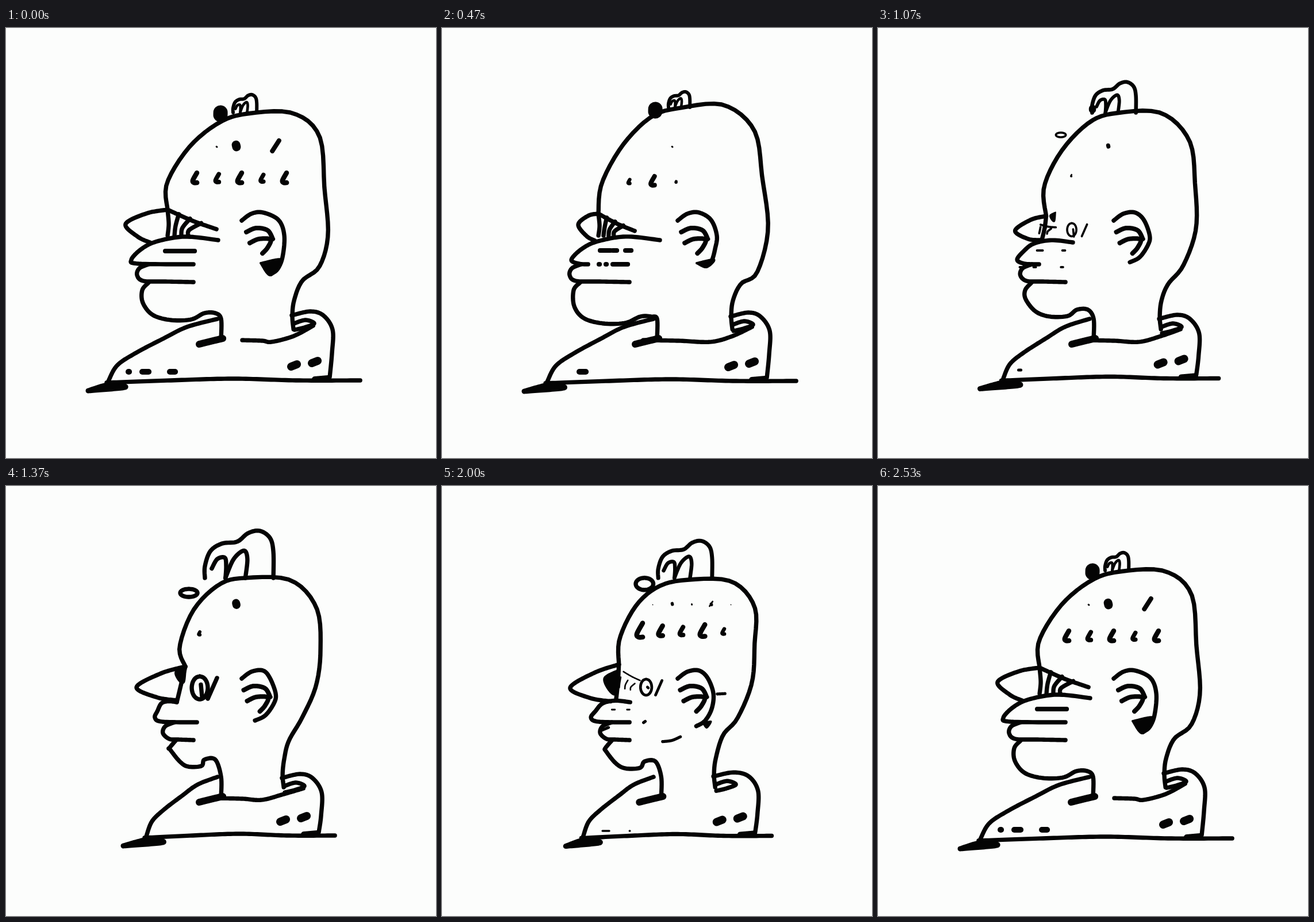
An HTML page with a canvas that plays this animation: 748 by 748 pixels, repeating every 2560 ms.

```html
<!DOCTYPE html>
<html lang="en">
<head>
<meta charset="utf-8">
<title>Morphing head</title>
<style>
html, body { margin: 0; overflow: hidden; background: #fcfdfc; }
canvas { display: block; }
</style>
</head>
<body>
<canvas id="stage" width="748" height="748"></canvas>
<script>
const ctx = document.getElementById('stage').getContext('2d');
const LOOP = 2560, STEPS = 76, SAMPLES = 72, LINE = 7.4;
const PAPER = '#fcfdfc', INK = '#040404';
const FILLED = ['lobe', 'nostril', 'shadow'];

const linear = k => k;
const smooth = k => k * k * (3 - 2 * k);
const easeIn = k => k ** 1.5;
const easeOut = k => 1 - (1 - k) ** 1.5;
const mix = (a, b, k) => a + (b - a) * k;
const between = (p, q, k, lift = 0) => [mix(p[0], q[0], k), mix(p[1], q[1], k) + lift];
const parse = text => text.split(' ').map(pair => pair.split(',').map(Number));

// Unit shapes, placed by position and size.
const BUN = parse('0,1 0,.75 .08,.43 .25,.27 .47,.23 .63,.05 .8,0 .95,.15 1,.45 1,1');
const CURL1 = parse('.1,.8 .18,.6 .29,.57 .31,.75 .3,1');
const CURL2 = parse('.3,1 .42,.6 .57,.42 .62,.6 .59,1');
const COLLAR = parse('0,0 .28,.13 .5,.32 .75,.55 .92,.75 1,1');
const EAR_FOLDS = [parse('418,355 435,348 455,352 464,367'), parse('424,374 440,367 460,368 455,382 446,392')];
const place = (shape, x, y, w, h) => shape.map(([u, v]) => [x + u * w, y + v * h]);
const ellipse = (x, y, rx, ry) => Array.from({ length: 13 }, (_, i) =>
  [x + rx * Math.sin(i * Math.PI / 6), y - ry * Math.cos(i * Math.PI / 6)]);

const poses = [
  { at: 0, ease: smooth, root: [281, 316],
    head: '280,270 318,208 370,165 420,149 498,148 545,188 554,280 560,360 545,415 515,440',
    noseTip: [208, 341], noseBase: [250, 373], lid: [366, 350],
    lip: [369, 369, 218, 326], lowerLip: 228, chin: [237, 508], throat: 374,
    neck: 497, shoulder: [568, 500], hem: 411, ground: [143, 616, 175, 613],
    ear: [484, 461, 428], lobe: true, tuft: [373, 151], bun: [395, 116, 41, 31],
    crown: [3, 15], slash: [469, 205], letters: [328, 263, 39, [1, 0.8, 1, 0.7, 1]],
    cheek: [277, 388, 26, [26, 25]], hemDots: [213, 598, 24, [1, 11, 0, 9]] },
  { at: 14, ease: linear, root: [272, 323],
    head: '278,270 315,203 365,154 415,139 490,134 543,178 557,260 567,350 548,425 520,445',
    noseTip: [237, 342], noseBase: [266, 370], lid: [335, 353],
    lip: [379, 369, 225, 254], lowerLip: 222, chin: [229, 514], throat: 374,
    neck: 502, shoulder: [570, 502], hem: 350, ground: [143, 616, 180, 614],
    ear: [478, 460, 414], lobe: true, tuft: [371, 145], bun: [394, 111, 37, 27],
    crown: [0, 3], letters: [325, 268, 41, [0.4, 0.9, 0.1]],
    cheek: [275, 387, 22, [18, 7, 10]], lipDots: [273, 411, 12, [1, 1, 10, 14]], hemDots: [215, 598, 24, [0, 11]] },
  { at: 23, ease: smooth, root: [273, 340],
    head: '276,272 313,211 366,156 415,136 490,132 543,180 556,260 567,350 547,423 517,448',
    noseTip: [250, 355], noseBase: [268, 365], lid: [319, 348],
    lip: [381, 370, 225, 228], lowerLip: 222, chin: [228, 516], throat: 376,
    neck: 498, shoulder: [568, 504], hem: 350, ground: [151, 613, 188, 611],
    ear: [476, 443, 407], tuft: [373, 143], bun: [399, 110, 33, 25],
    cheek: [273, 387, 23, [17, 0, 8]], lipDots: [245, 416, 24, [7, 7, 0, 6]], hemDots: [219, 595, 24, [0, 7]] },
  { at: 41, ease: smooth, root: [312, 314],
    head: '302,280 326,216 370,172 415,160 495,164 540,212 547,285 539,348 515,403 492,443',
    noseTip: [227, 350], noseBase: [297, 373], nostril: 0.45, eye: [337, 351, 22],
    lip: [297, 376, 259, 332], lowerLip: 273, chin: [284, 488], throat: 374,
    neck: 480, shoulder: [549, 508], hem: 365, ground: [204, 572, 241, 608],
    ear: [469, 433, 408], side: [318, 186, 15, 7], bun: [346, 78, 119, 82],
    crown: [0, 14], letters: [336, 257, 0, [0.3]] },
  { at: 53, ease: easeIn, root: [313, 309],
    head: '316,266 342,209 375,180 425,168 510,172 545,213 544,280 535,352 505,405 480,435',
    noseTip: [225, 355], noseBase: [305, 376], nostril: 1, eye: [355, 350, 2],
    lip: [305, 380, 269, 325], lowerLip: 289, chin: [299, 487], throat: 383,
    neck: 465, shoulder: [544, 507], ground: [241, 556, 264, 605],
    ear: [466, 432, 412], side: [337, 183, 16, 7], bun: [362, 87, 119, 78],
    crown: [0, 0, 0, 8], letters: [350, 250, 35, [1.6, 1, 0.7, 1.3, 0.2]],
    lines: ['275,426 292,419', '350,412 354,409', '377,446 400,443 421,434', '476,362 495,361'] },
  { at: 67, ease: easeOut, root: [298, 313],
    head: '296,266 326,211 375,168 425,155 490,155 541,205 543,270 546,325 530,402 505,430',
    noseTip: [219, 344], noseBase: [270, 372], lid: [362, 347],
    lip: [368, 369, 241, 328], lowerLip: 250, chin: [257, 499], throat: 378,
    neck: 485, shoulder: [560, 502], ground: [168, 605, 203, 615],
    ear: [483, 461, 428], lobe: true, side: [380, 147, 14, 17], bun: [402, 111, 47, 40],
    crown: [4, 15, 8, 0, 4], slash: [468, 205], letters: [331, 262, 39, [1.1, 1, 1, 1, 1.1]],
    cheek: [292, 389, 27, [12, 10]], hemDots: [245, 600, 27, [7, 26, 0, 1]] }
];

const spline = (a, b, c, d, u) =>
  b + u * (c - a + u * (2 * a - 5 * b + 4 * c - d + u * (3 * (b - c) + d - a))) / 2;

function sample(knots) {
  const last = knots.length - 1;
  const knot = i => knots[Math.max(0, Math.min(last, i))];
  return Array.from({ length: SAMPLES }, (_, i) => {
    const s = i / (SAMPLES - 1) * last, j = Math.floor(s);
    const at = axis => spline(knot(j - 1)[axis], knot(j)[axis], knot(j + 1)[axis], knot(j + 2)[axis], s - j);
    return [at(0) + i * 0.002, at(1)]; // the nudge keeps single dots drawable
  });
}

function buildStrokes(pose) {
  const strokes = {};
  const add = (name, knots, width = LINE) => { strokes[name] = { points: sample(knots), width }; };
  const dashes = (name, [x, y, gap, lengths], width) => lengths.forEach((length, i) => {
    if (length) add(name + i, [[x + i * gap, y], [x + i * gap + length, y]], width);
  });
  const { root, noseTip, noseBase, lid, throat, neck } = pose;
  const [edge, top] = pose.shoulder;
  const [left, right, heel, floor] = pose.ground;
  const [earEdge, earEnd, earBottom] = pose.ear;

  add('head', [root, ...parse(pose.head), [neck + 4, 474], [neck + 1, 502], [neck + 3, 524]]);
  add('nose', [root, between(root, noseTip, 0.5, -6), noseTip, between(noseTip, noseBase, 0.5, 6), noseBase]);

  const [lipX, lipY, tip, lipEnd] = pose.lip, lipWidth = lipX - tip;
  add('upperLip', [[lipX, lipY], [lipX - lipWidth * 0.38, lipY - lipWidth * 0.04], [lipX - lipWidth * 0.7, lipY + 2],
    [lipX - lipWidth * 0.88, lipY + 15], [tip, 403], [tip + 13, 410], [lipEnd, 411]]);
  const low = pose.lowerLip;
  add('lowerLip', [[low + 20, 411], [low + 4, 418], [low, 430], [low + 11, 440], [mix(low, 326, 0.5), 441], [326, 442]]);
  const [front, bottom] = pose.chin;
  add('chin', [[front + 11, 443], [front, 456], [front + 1, bottom - 30], [front + 18, bottom - 9],
    [mix(front, throat, 0.36), bottom], [mix(front, throat, 0.62), bottom - 1],
    [throat - 29, bottom - 12], [throat - 10, bottom - 12], [throat, 506], [throat, 540]]);

  if (lid) {
    add('brow', [root, between(root, lid, 0.5, 2), lid]);
    for (let i = 0; i < 4; i++) {
      const from = between(root, lid, i * 0.23), x = mix(root[0], lid[0], i * 0.14);
      add('lash' + i, [from, [x + 2, mix(from[1], 361, 0.55)], [x, 361]]);
    }
  } else {
    const [x, y, pupil] = pose.eye;
    add('lash0', [root, [lipX, lipY]]);
    add('eye', ellipse(x, y, 14, 20));
    add('pupil', [[x + 2, y - pupil / 4], [x + 4, y + pupil * 0.75]]);
    add('wink', [[x + 30, y - 17], [x + 14, y + 19]]);
    add('nostril', place(parse('0,0 -37,21 -24,54 -6,59 0,0'), ...root, pose.nostril, pose.nostril), 4);
  }

  add('ear', [[410, 335], [427, 323], [447, 321], [earEdge - 10, 334], [earEdge, 361],
    [earEdge - 3, earBottom - 30], [mix(earEdge, earEnd, 0.5), earBottom - 9], [earEnd, earBottom]]);
  EAR_FOLDS.forEach((fold, i) => add('fold' + i, place(fold, (earEdge - 484) * 0.3, 0, 1, 1), 8));
  if (pose.lobe) add('lobe', [[443, 409], [earEdge - 5, 403], [460, earBottom + 2], [443, 409]], 4);

  const [, , bunWidth] = pose.bun, curlWidth = Math.min(LINE, 3 + bunWidth / 25);
  add('bun', place(BUN, ...pose.bun), Math.min(LINE, 5 + bunWidth / 40));
  add('curl1', place(CURL1, ...pose.bun), curlWidth);
  add('curl2', place(CURL2, ...pose.bun), curlWidth);
  if (pose.tuft) add('tuft', [pose.tuft, between(pose.tuft, pose.tuft, 0, -4)], 25);
  if (pose.side) add('side', ellipse(...pose.side));

  add('collar', place(COLLAR, 368, 506, heel + 3 - 368, floor + 1 - 506));
  add('lapel', [[throat - 38, 550], [throat - 18, 545], [throat + 3, 540]], 12);
  if (pose.hem) add('hem', [[pose.hem, 543], [mix(pose.hem, neck, 0.4), 544], [neck - 35, 546], [neck + 3, 536], [neck + 37, top + 18]]);
  add('shoulder', [[neck, top], [mix(neck, edge, 0.45), top - 7], [edge - 16, top], [edge, top + 25], [edge - 1, top + 65], [edge - 5, floor - 6]]);
  add('cuff', [[neck + 4, top + 14], [neck + 24, top + 8], [neck + 39, top + 14], [neck + 22, top + 21], [neck + 5, top + 25]]);
  for (let i = 0; i < 2; i++) {
    const x = edge - 67 + i * 36, y = floor - 26 - i * 6;
    add('button' + i, [[x - 5, y + 2], [x + 5, y - 2]], 14);
  }
  add('base', [[heel, floor + 4], [mix(heel, right, 0.25), floor], [mix(heel, right, 0.5), floor - 3], [mix(heel, right, 0.75), floor], [right, floor]]);
  add('shadow', [[left, floor + 18], [heel + 32, floor + 12], [heel + 6, floor + 7], [left, floor + 18]], 9);
  add('foot', [[edge - 31, floor - 2], [edge - 8, floor - 4]], 10);

  (pose.crown || []).forEach((size, i) => {
    if (size) add('crown' + i, [[367 + i * 34, 207], [366 + i * 34, 207 - size * 0.25]], size);
  });
  if (pose.slash) add('slash', [between(pose.slash, [0, 0], 0, -9), pose.slash, between(pose.slash, [0, 0], 0, 9)]
    .map(([x, y]) => [x - (y - pose.slash[1]) * 0.65, y]), 8);
  if (pose.letters) {
    const [x, y, gap, sizes] = pose.letters;
    sizes.forEach((size, i) =>
      add('letter' + i, place(parse('4,-11 -3,2 -1,6 4,6'), x + i * gap, y, size, size), 4.5 + 4 * Math.min(1, size)));
  }
  if (pose.cheek) dashes('cheek', pose.cheek, 8);
  if (pose.lipDots) dashes('lipDot', pose.lipDots, 8);
  if (pose.hemDots) dashes('hemDot', pose.hemDots, 10);
  (pose.lines || []).forEach((text, i) => add('line' + i, parse(text), 8));
  return strokes;
}

for (const pose of poses) pose.strokes = buildStrokes(pose);
const names = [...new Set(poses.flatMap(pose => Object.keys(pose.strokes)))];

// A stroke missing on one side shrinks into its own centre.
function shrunk({ points }) {
  const centre = [0, 1].map(axis => points.reduce((sum, p) => sum + p[axis], 0) / SAMPLES);
  return { points: points.map(p => between(p, centre, 0.85)), width: 0 };
}

function drawStroke(name, from, to, k) {
  if (!from && !to) return;
  from = from || shrunk(to);
  to = to || shrunk(from);
  const width = mix(from.width, to.width, k);
  if (width < 0.5) return;
  ctx.beginPath();
  from.points.forEach((p, i) => ctx.lineTo(...between(p, to.points[i], k)));
  ctx.lineWidth = width;
  ctx.stroke();
  if (FILLED.includes(name)) ctx.fill();
}

function draw(time) {
  const step = Math.min(STEPS, Math.floor((time % LOOP + 4) * 0.03));
  const index = poses.findLastIndex(pose => pose.at <= step);
  const from = poses[index], to = poses[(index + 1) % poses.length];
  const k = from.ease((step - from.at) / ((to.at || STEPS) - from.at));
  ctx.fillStyle = PAPER;
  ctx.fillRect(0, 0, 748, 748);
  ctx.fillStyle = ctx.strokeStyle = INK;
  ctx.lineCap = ctx.lineJoin = 'round';
  for (const name of names) drawStroke(name, from.strokes[name], to.strokes[name], k);
}

const start = performance.now();
function tick() {
  draw(performance.now() - start);
  requestAnimationFrame(tick);
}
tick();
</script>
</body>
</html>
```
